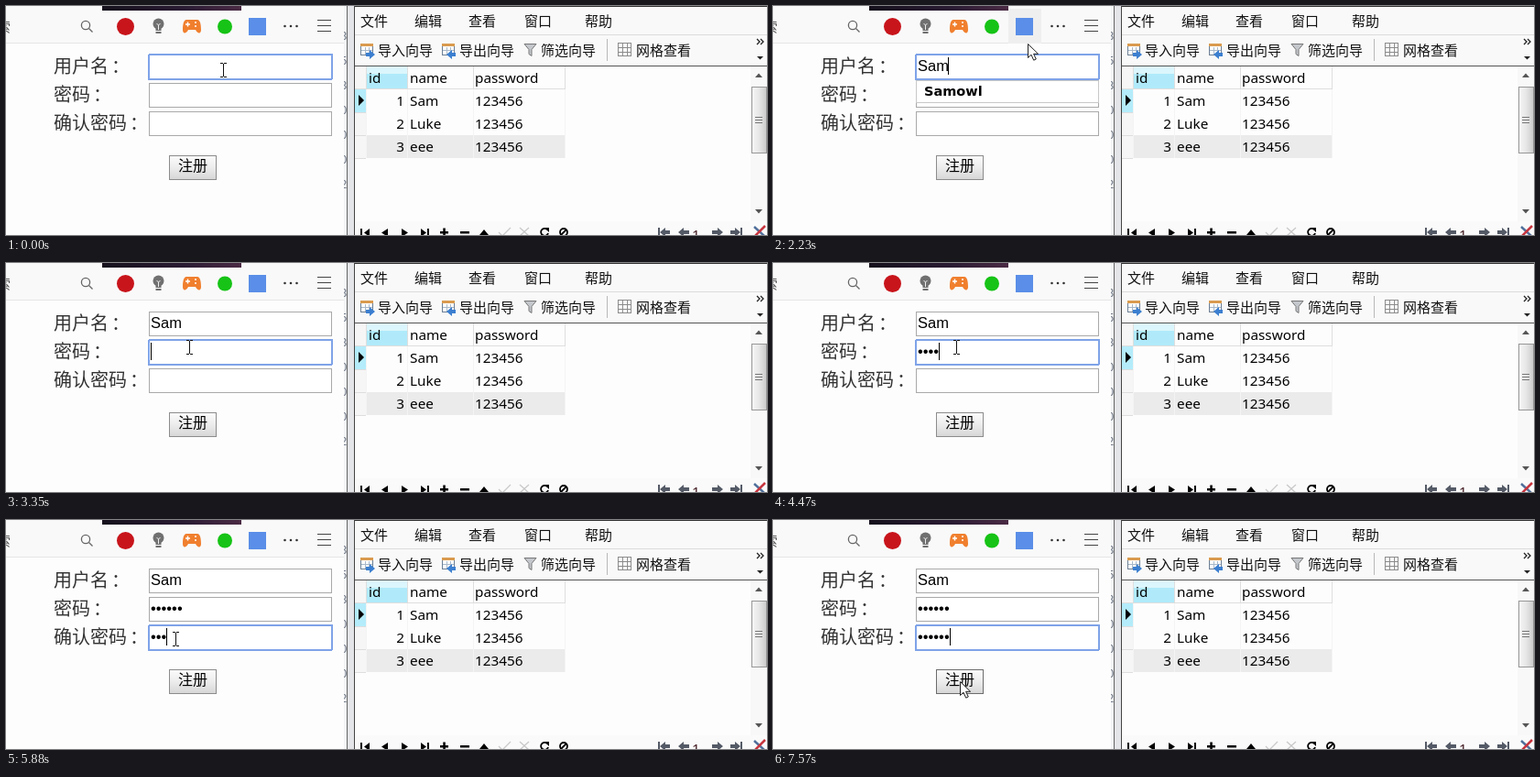
Write an HTML page that moves like this. It is 831x250 px and loops after 8 s.

```html
<!DOCTYPE html>
<html lang="zh-CN">
<head>
<meta charset="utf-8">
<title>注册</title>
<style>
  html, body { margin: 0; width: 831px; height: 250px; overflow: hidden; background: #fff; }
  svg { display: block; }
  text { font-family: "Noto Sans CJK SC", "Noto Sans CJK", sans-serif; white-space: pre; }
  rect, .crisp { shape-rendering: crispEdges; }
  .label { font-size: 20px; font-weight: 300; fill: #333; }
  .menu { font-size: 15px; fill: #111; }
  .cell { font: 15.3px "Noto Sans", "Open Sans", sans-serif; fill: #000; }
  .value { font: 16.5px "Liberation Sans", Arial, sans-serif; fill: #000; }
  .option { font: bold 14.5px "DejaVu Sans", sans-serif; }
  .scrap { font: 13px "Liberation Sans", sans-serif; fill: #6d7684; }
  .field { fill: #fff; stroke: #a9a9a9; width: 199px; height: 26px; }
  .field.focus { stroke: #7fa3e8; stroke-width: 2; width: 200px; height: 27px; transform: translate(-.5px, -.5px); }
</style>
</head>
<body>
<svg width="831" height="250" viewBox="0 0 831 250">
  <defs>
    <linearGradient id="face" x2="0" y2="1">
      <stop stop-color="#fbfbfb"/><stop offset=".5" stop-color="#ececec"/><stop offset="1" stop-color="#d6d6d6"/>
    </linearGradient>
    <linearGradient id="thumb">
      <stop stop-color="#f6f6f6"/><stop offset=".5" stop-color="#e6e6e6"/><stop offset="1" stop-color="#cbcbcb"/>
    </linearGradient>
    <linearGradient id="banner">
      <stop stop-color="#15101c"/><stop offset=".6" stop-color="#2a1c33"/><stop offset="1" stop-color="#4a2a44"/>
    </linearGradient>
    <clipPath id="gap"><path d="M369 0h3v250h-3z"/></clipPath>
  </defs>

  <!-- browser -->
  <rect width="369" height="250" fill="#fdfdfd"/>
  <rect width="369" height="40" fill="#f9f9f9"/>
  <rect y="40" width="369" height="1" fill="#e6e6e6"/>
  <rect x="105" width="152" height="5" fill="url(#banner)"/>
  <rect id="hover" x="257" y="3" width="36" height="38" fill="#efefef"/>
  <text x="-10" y="28" font-size="15" fill="#555">索</text>
  <g fill="none" stroke="#666" stroke-width="1.3"><circle cx="87" cy="21" r="4.6"/><path d="M90.5 24.5l4 4"/></g>
  <circle cx="130.500" cy="22.500" r="9.500" fill="#c8141b"/>
  <g fill="#707070"><circle cx="166.500" cy="19.500" r="6"/><path d="M163.500 24h6v3h-6zM163.500 28h6v2h-6z"/></g>
  <path fill="none" stroke="#eee" d="M164.500 19l2 2 2-2M166.500 21v5"/>
  <path fill="#f07f2e" d="M197 15h12c3 0 4 5 4 11 0 5-4 4-6 0h-8c-2 4-6 5-6 0 0-6 1-11 4-11z"/>
  <path stroke="#fff" stroke-width="1.500" d="M196 20h5M198.500 17.500v5M206 18h2M206 22h2"/>
  <circle cx="239" cy="22.500" r="8" fill="#16c316"/>
  <rect x="265" y="13" width="19" height="19" fill="#5a8ee8"/>
  <g fill="#333"><circle cx="304.500" cy="22" r="1.300"/><circle cx="311" cy="22" r="1.300"/><circle cx="317.500" cy="22" r="1.300"/></g>
  <path class="crisp" stroke="#444" d="M340 15.500h15M340 21.500h15M340 27.500h15"/>

  <text class="label" x="52" y="73">用户名<tspan dx="3">：</tspan></text>
  <text class="label" x="52" y="104">密码<tspan dx="3">：</tspan></text>
  <text class="label" x="52" y="135">确认密码<tspan dx="3">：</tspan></text>
  <g id="fields"></g>
  <g id="list">
    <rect x="156.500" y="81.500" width="199" height="24" fill="#fff" stroke="#c8c8c8"/>
    <text class="option" x="165" y="98">Samowl</text>
  </g>
  <rect id="caret" y="56" width="1" height="19" fill="#000"/>
  <rect id="button" x="178.500" y="163.500" width="51" height="26" fill="url(#face)"/>
  <text x="188" y="180" font-size="16">注册</text>

  <!-- strip between the windows -->
  <rect x="369" width="3" height="250" fill="#f1f2f4"/>
  <g id="scraps" clip-path="url(#gap)"></g>
  <rect x="372" width="1" height="250" fill="#666"/>
  <rect x="373" width="7" height="250" fill="#e3e5e8"/>
  <rect x="380" width="1" height="250" fill="#444"/>

  <!-- database window -->
  <rect x="381" width="450" height="250" fill="#fdfdfd"/>
  <rect x="381" width="450" height="65" fill="#f9f9f9"/>
  <rect x="381" width="450" height="1" fill="#333"/>
  <rect x="381" y="31" width="450" height="1" fill="#dcdcdc"/>
  <rect x="381" y="65" width="450" height="1" fill="#555"/>
  <g id="menus"></g>
  <g id="icons">
    <g id="sheet" class="crisp">
      <rect x="387.500" y="41.500" width="13" height="12" fill="#fff" stroke="#6b7f95"/>
      <rect x="387" y="41" width="14" height="3" fill="#d99a4e"/>
      <path stroke="#a9b8c8" d="M388 48.500h12M392.500 45v8M396.500 45v8"/>
    </g>
    <use href="#sheet" x="89"/>
    <path fill="#3c7fd0" d="M393 51h4v-3l6 5-6 5v-3h-4zM491 51h-4v-3l-6 5 6 5v-3h4z"/>
    <path fill="#c4c8cc" stroke="#777" d="M566 41.500h13l-5 6v7l-3-2v-5z"/>
    <rect x="656" y="36" width="1" height="24" fill="#b8b8b8"/>
    <path class="crisp" fill="#fff" stroke="#8b8b8b" d="M668.500 40.500h14v14h-14zM668.500 45.500h14M668.500 50.500h14M673.500 40.500v14M678.500 40.500v14"/>
    <path fill="none" stroke="#222" stroke-width="1.300" d="M820 36l3 3-3 3M824 36l3 3-3 3"/>
    <path d="M820 55h7l-3.500 3.500z" fill="#222"/>
  </g>

  <rect x="381" y="66" width="12" height="100" fill="#f6f6f6"/>
  <rect x="393" y="66" width="45" height="25" fill="#dcf6fd"/>
  <rect x="393" y="74" width="45" height="16" fill="#b0eafa"/>
  <rect x="381" y="91" width="12" height="25" fill="#b4ecfb"/>
  <rect x="393" y="141" width="217" height="25" fill="#ebebeb"/>
  <path class="crisp" fill="none" stroke="#f4f4f4" d="M393.500 91v75M438.500 91v75M510.500 91v75M610.500 91v75"/>
  <path class="crisp" fill="none" stroke="#dedede" d="M381 90.500h230M393.500 66v25M438.500 66v25M510.500 66v25M610.500 66v25M381 116.500h12M381 141.500h12M381 166.500h12"/>
  <path d="M385 97v12l6-6z"/>
  <g id="table"></g>

  <rect x="813" y="66" width="18" height="169" fill="#f8f8f8"/>
  <rect x="814.500" y="88.500" width="16" height="72" fill="url(#thumb)" stroke="#979797"/>
  <path class="crisp" stroke="#777" d="M818 121.500h8M818 124.500h8M818 127.500h8"/>
  <path fill="#555" d="M818 78h8l-4-4.500zM818 222h8l-4 4.500z"/>

  <rect x="381" y="235" width="450" height="15" fill="#fafafa"/>
  <path class="crisp" d="M387 243h2v9h-2z"/>
  <path d="M397 243v9l-6-4.500zM417 243v9l-7-4.500zM432 243v9l7-4.500zM453 243v9l6-4.500zM460 243h2v9h-2zM474 246h9v2.500h-9zM477.300 242.500h2.500v9h-2.500zM496 246h10v2.500h-10zM517 250l5-6 5 6z"/>
  <path fill="none" stroke="#c9c9c9" stroke-width="1.300" d="M538 247l4 4 9-9M561 242l10 9M571 242l-10 9"/>
  <g fill="none" stroke="#000" stroke-width="1.800"><path d="M591 244a4 4 0 1 0 1 4"/><circle cx="609" cy="247" r="4"/><path d="M606 250l6-6"/></g>
  <path d="M588 242h5v5z"/>
  <path fill="#545a66" d="M712 242h2v9h-2zM714 247l6-5v3h5v4h-5v3zM734 247l6-5v3h6v4h-6v3zM783 247l-6-5v3h-6v4h6v3zM802 247l-6-5v3h-5v4h5v3zM802 242h2v9h-2z"/>
  <text class="cell" x="749" y="255" style="fill:#40181e">1</text>
  <path stroke="#4f6f9b" stroke-width="2.500" d="M817 241l11 10"/><path stroke="#c7343d" stroke-width="2.500" d="M829 240l-11 11"/>

  <path id="arrow" fill="#fff" stroke="#222" d="M-.5 .5v15l3.500-3.300 2.700 6 2.600-1.200-2.700-5.700h5z"/>
  <path id="beam" class="crisp" fill="none" stroke="#111" d="M-3 -7.500h3M1 -7.500h3M.5 -7v14M-3 7.500h3M1 7.500h3"/>
</svg>
<script>
const LOOP = 8000;
const $ = id => document.getElementById(id);

function add(parent, tag, attrs, content = "") {
  const el = document.createElementNS("http://www.w3.org/2000/svg", tag);
  for (const key in attrs) el.setAttribute(key, attrs[key]);
  el.textContent = content;
  $(parent).append(el);
  return el;
}
const label = (parent, cls, x, y, text, anchor = "start") =>
  add(parent, "text", { class: cls, x, y, "text-anchor": anchor }, text);

[["文件", 387], ["编辑", 446], ["查看", 505], ["窗口", 566], ["帮助", 632]]
  .forEach(([text, x]) => label("menus", "menu", x, 22, text));
[["导入向导", 406], ["导出向导", 495], ["筛选向导", 584], ["网格查看", 688]]
  .forEach(([text, x]) => label("menus", "menu", x, 54, text));

label("table", "cell", 396, 84, "id");
label("table", "cell", 441, 84, "name");
label("table", "cell", 512, 84, "password");
["Sam", "Luke", "eee"].forEach((name, i) => {
  const y = 109 + 25 * i;
  label("table", "cell", 435, y, i + 1, "end");
  label("table", "cell", 441, y, name);
  label("table", "cell", 512, y, "123456");
});

[..."3530002"].forEach((digit, i) => label("scraps", "scrap", 365, 37 + 27 * i, digit));

const fields = [0, 1, 2].map(i => ({
  box: add("fields", "rect", { x: 156.5, y: 53.5 + 31 * i, rx: 1 }),
  text: label("fields", "value", 158, 71 + 31 * i, ""),
}));

// Each step changes part of the state; m = pointer, v = typed lengths.
const steps = [
  [0, { m: [237, 70], beam: true, v: [0, 0, 0], focus: 0, caret: false, list: false }],
  [150, { caret: true }],
  [550, { v: [2, 0, 0], list: true }],
  [700, { v: [3, 0, 0] }],
  [1260, { caret: false }],
  [1690, { caret: true, m: [283, 16], beam: false }],
  [1840, { m: [282, 28] }],
  [2110, { m: [280, 37] }],
  [2230, { m: [279, 41] }],
  [2380, { m: [243, 112] }],
  [2500, { m: [203, 174] }],
  [2650, { m: [150, 190] }],
  [2800, { m: [102, 186], focus: -1, list: false }],
  [2920, { m: [145, 150] }],
  [3070, { m: [200, 92], beam: true }],
  [3350, { focus: 1, caret: true }],
  [3770, { caret: false }],
  [3890, { v: [3, 1, 0], caret: true }],
  [4040, { v: [3, 2, 0] }],
  [4320, { v: [3, 3, 0] }],
  [4470, { v: [3, 4, 0] }],
  [4750, { v: [3, 5, 0] }],
  [4900, { v: [3, 6, 0] }],
  [5020, { m: [192, 112] }],
  [5180, { m: [185, 130] }],
  [5330, { focus: 2 }],
  [5610, { v: [3, 6, 1] }],
  [5760, { v: [3, 6, 2] }],
  [5880, { v: [3, 6, 3] }],
  [6180, { v: [3, 6, 4] }],
  [6330, { v: [3, 6, 5] }],
  [6450, { v: [3, 6, 6] }],
  [6600, { m: [188, 150], beam: false }],
  [6830, { m: [200, 184] }],
  [7100, { m: [205, 176], caret: false }],
  [7570, { caret: true }],
];
const nameEnds = [158, 169, 178, 191];
const show = (id, on) => $(id).setAttribute("visibility", on ? "visible" : "hidden");

function draw(t) {
  const s = Object.assign({}, ...steps.filter(([at]) => at <= t).map(([, change]) => change));
  const [x, y] = s.m;

  fields.forEach(({ box, text }, i) => {
    box.setAttribute("class", i === s.focus ? "field focus" : "field");
    text.textContent = i ? "•".repeat(s.v[i]) : "Sam".slice(0, s.v[0]);
  });
  show("list", s.list);
  show("caret", s.caret && s.focus >= 0);
  if (s.focus >= 0) {
    const n = s.v[s.focus];
    $("caret").setAttribute("x", s.focus ? Math.round(158 + 5.8 * n) : nameEnds[n]);
    $("caret").setAttribute("y", 56 + 31 * s.focus);
  }

  const overButton = x >= 178 && x < 230 && y >= 163 && y < 190;
  $("button").setAttribute("stroke", overButton ? "#6c6c6c" : "#8c8c8c");
  show("hover", x >= 257 && x < 293 && y <= 41);
  show("arrow", !s.beam);
  show("beam", s.beam);
  $(s.beam ? "beam" : "arrow").setAttribute("transform", `translate(${x} ${y})`);
}

const start = performance.now();
function tick() {
  draw((performance.now() - start) % LOOP);
  requestAnimationFrame(tick);
}
tick();
</script>
</body>
</html>
```
